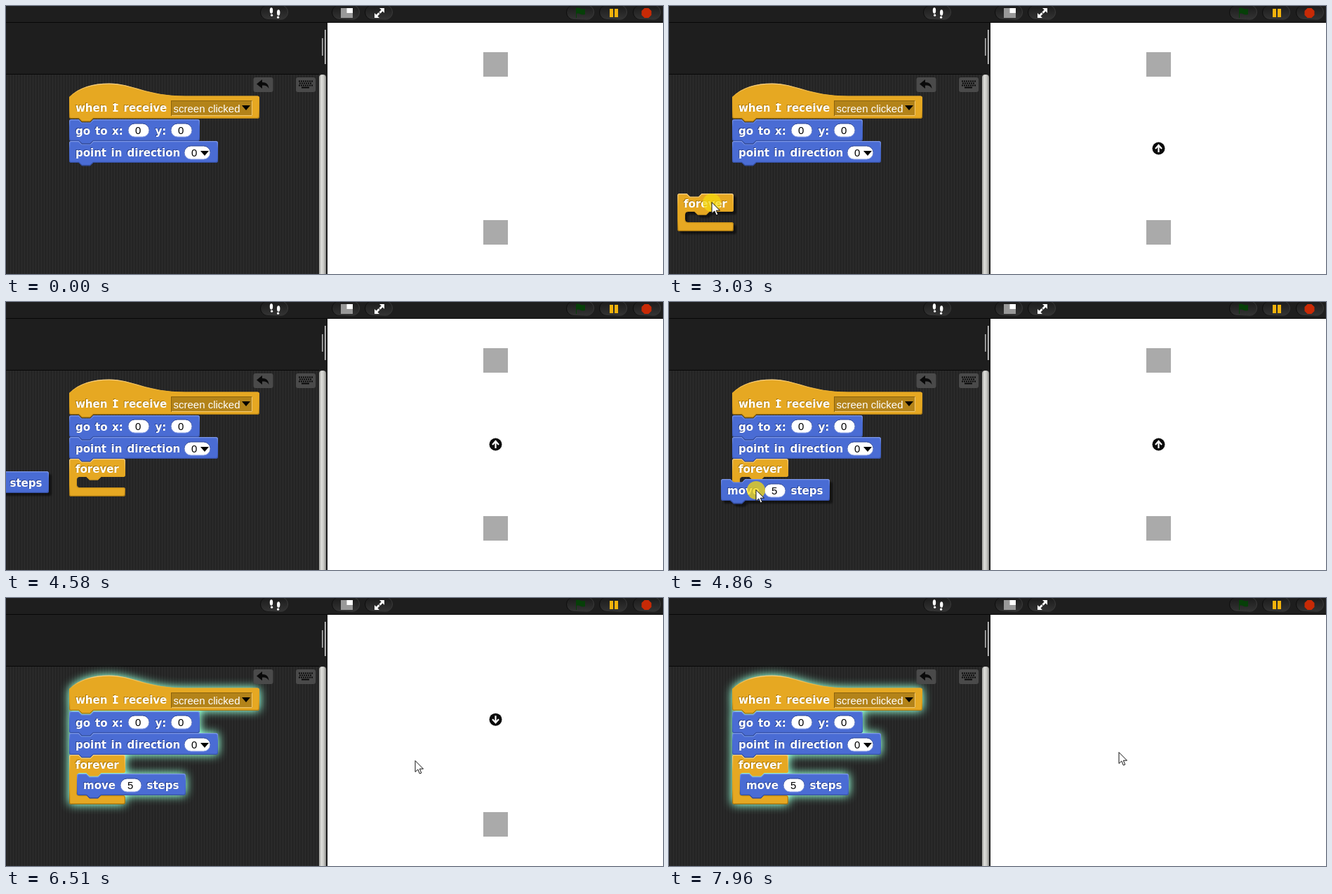
An HTML page that plays this animation: 936 by 383 pixels, repeating every 8 s.

```html
<!DOCTYPE html>
<html lang="en">
<head>
<meta charset="utf-8">
<title>Block script demo</title>
<style>
  html, body { margin: 0; width: 100%; height: 100%; overflow: hidden; background: #1e1e1e; }
  svg { display: block; }
  .word { font: bold 15px "DejaVu Sans", Verdana, sans-serif; }
  .value { font: 15px "Liberation Sans", Arial, sans-serif; }
</style>
</head>
<body>
<svg id="view" width="936" height="383" viewBox="0 0 936 383">
  <defs>
    <linearGradient id="blueEdge" x2="0" y2="1">
      <stop offset="0" stop-color="#7f99e8"/><stop offset=".3" stop-color="#4a6cd4"/>
      <stop offset=".7" stop-color="#4262c4"/><stop offset="1" stop-color="#2b418a"/>
    </linearGradient>
    <linearGradient id="goldEdge" x2="0" y2="1">
      <stop offset="0" stop-color="#f5d088"/><stop offset=".35" stop-color="#e6a822"/>
      <stop offset=".7" stop-color="#d59a1c"/><stop offset="1" stop-color="#94690f"/>
    </linearGradient>
    <linearGradient id="ovalEdge" x2="0" y2="1">
      <stop offset="0" stop-color="#2c4490"/><stop offset="1" stop-color="#8ea4ea"/>
    </linearGradient>
    <linearGradient id="pill" x2="0" y2="1">
      <stop offset="0" stop-color="#1a1a1a"/><stop offset="1" stop-color="#343434"/>
    </linearGradient>
    <linearGradient id="pillEdge">
      <stop offset="0" stop-color="#0c0c0c"/><stop offset="1" stop-color="#3a3a3a"/>
    </linearGradient>
    <linearGradient id="bar">
      <stop offset="0" stop-color="#a0a09c"/><stop offset=".35" stop-color="#dededa"/>
      <stop offset=".7" stop-color="#c4c4c0"/><stop offset="1" stop-color="#858582"/>
    </linearGradient>
    <pattern id="weave" width="4" height="4" patternUnits="userSpaceOnUse">
      <rect width="4" height="4" fill="#292929"/>
      <rect width="1" height="4" fill="#202020"/>
    </pattern>
    <filter id="glow" x="-20%" y="-20%" width="140%" height="140%" color-interpolation-filters="sRGB">
      <feGaussianBlur in="SourceAlpha" stdDeviation="7" result="soft"/>
      <feComponentTransfer in="soft" result="halo">
        <feFuncR type="linear" slope="0" intercept=".56"/>
        <feFuncG type="linear" slope="0" intercept=".96"/>
        <feFuncB type="linear" slope="0" intercept=".8"/>
        <feFuncA type="linear" slope="1.35"/>
      </feComponentTransfer>
      <feMerge><feMergeNode in="halo"/><feMergeNode in="SourceGraphic"/></feMerge>
    </filter>
    <filter id="lift" x="-10%" y="-10%" width="130%" height="150%">
      <feDropShadow dx="4" dy="4" stdDeviation="1.2" flood-color="#000" flood-opacity=".5"/>
    </filter>
  </defs>

  <!-- stage -->
  <rect x="458" y="24" width="478" height="359" fill="#fff"/>
  <rect id="topBox" x="680" y="66" width="35" height="35" fill="#aaa"/>
  <rect id="lowBox" x="680" y="306" width="35" height="35" fill="#aaa"/>
  <g id="ball">
    <circle r="9" fill="#0a0a0a"/>
    <path d="M0 5.5V-4M-4.5 .5L0-4.5L4.5 .5" fill="none" stroke="#fff" stroke-width="2.2"/>
  </g>

  <!-- panels -->
  <rect width="936" height="24" fill="#1e1e1e"/>
  <rect y="24" width="458" height="74" fill="#1e1e1e"/>
  <path d="M0 23.5H936M0 97.5H446" stroke="#070707"/>
  <rect y="98" width="446" height="285" fill="url(#weave)"/>
  <rect x="446" y="98" width="12" height="285" fill="#222"/>
  <path d="M446 383V102q0-4 5-4t5 4V383z" fill="url(#bar)"/>
  <path d="M457.5 24V383" stroke="#111"/>
  <path d="M450.8 46V71" stroke="#b0b0b0" stroke-width="1.6"/>
  <path d="M454.8 34V83" stroke="#d0d0d0" stroke-width="1.6"/>

  <!-- toolbar -->
  <g id="pills"></g>
  <g fill="#fff">
    <ellipse cx="378" cy="6.5" rx="2.2" ry="4.2"/><circle cx="378.6" cy="13.2" r="1.6"/>
    <ellipse cx="388.2" cy="9.5" rx="2.2" ry="4.2"/><circle cx="387.6" cy="16.2" r="1.6"/>
    <path d="M539 3v7l-2.4-2.4-3.2 3.2-2-2 3.2-3.2L532 3zM525 17v-7l2.4 2.4 3.2-3.2 2 2-3.2 3.2L532 17z"/>
  </g>
  <rect x="477" y="3" width="17" height="14" fill="#999"/>
  <rect x="485.500" y="3" width="8.500" height="7" fill="#fff"/>
  <path d="M812 17V3c5-2 7 3 13 1v8c-6 2-8-3-12-1v6z" fill="#063f08"/>
  <path d="M860 4h5v12h-5zM867 4h5v12h-5z" fill="#f2b20c"/>
  <path d="M909.6 3h5.800l4.100 4.100v5.800l-4.100 4.100h-5.800l-4.100-4.100v-5.800z" fill="#c82a06"/>

  <!-- scripts -->
  <g id="script"></g>
  <rect id="hint" height="5" rx="2" fill="#fff"/>
  <g id="loopDrag" filter="url(#lift)"></g>
  <g id="stepDrag" filter="url(#lift)"></g>

  <g transform="translate(0 -1)">
    <g fill="#4a4a4a">
      <rect x="352.5" y="103" width="28" height="21" rx="3"/>
      <rect x="413" y="103" width="28" height="21" rx="3"/>
    </g>
    <path d="M357 112.5l8-6.5v4c6 0 9 3 9.5 9c-2.5-4-5-4.5-9.5-4.5v4.5z" fill="#0a0a0a"/>
    <path d="M417 108.5h20M418 111.5h18M417 114.5h20" stroke="#0a0a0a" stroke-width="2" stroke-dasharray="2 1"/>
    <path d="M421 117.5h11" stroke="#0a0a0a" stroke-width="2"/>
  </g>

  <circle id="press" r="13" fill="#f4d80e" opacity=".75"/>
  <path id="cursor" d="M0 .5V16.5L3.8 13L6.3 19L8.8 18L6.3 12.200H11.500Z" fill="#fff" stroke="#111"/>
</svg>
<script>
const $ = id => document.getElementById(id);

// ---- block shapes ----
const DENT = 'H13.5l4.5 4.5h12l4.5-4.5';
const END = 'q0 3-3 3H34.5l-4.5 4.5h-12l-4.5-4.5H3q-3 0-3-3';
const command = (w, h) => `M0 3q0-3 3-3${DENT}H${w - 3}q3 0 3 3V${h - 3}${END}z`;
const hat = `M0 1C14-13 34-18.5 57-18.5C90-18.5 110-.5 165-.5H268q3 0 3 3V29${END}z`;
const cShape = s => `M0 3q0-3 3-3${DENT}H77q3 0 3 3V23q0 3-3 3H45.5l-4.5 4.5h-12l-4.5-4.5H15` +
  `q-4 0-4 4V${22 + s}q0 4 4 4H77q3 0 3 3v7q0 3-3 3H3q-3 0-3-3z`;

const TONES = { blue: ['#4a6cd4', '#2c4490'], gold: ['#e6a822', '#a87810'] };
let clips = 0;

// The bevel is a stroke clipped to the block, so it stays inside the outline.
function block(tone, x, y, path, words, extra = '') {
  const [fill, dark] = TONES[tone], clip = `clip${clips++}`;
  const text = words.map(([wx, wy, s]) =>
    `<text class="word" x="${wx - 1}" y="${wy - 1}" fill="${dark}">${s}</text>` +
    `<text class="word" x="${wx}" y="${wy}" fill="#fff">${s}</text>`).join('');
  return `<g transform="translate(${x} ${y})"><clipPath id="${clip}"><path d="${path}"/></clipPath>` +
    `<path d="${path}" fill="${fill}" stroke="url(#${tone}Edge)" stroke-width="2.4" ` +
    `clip-path="url(#${clip})"/>${text}${extra}</g>`;
}

const oval = (x, y, w, s) =>
  `<rect x="${x}" y="${y}" width="${w}" height="19" rx="9.5" fill="#fff" stroke="url(#ovalEdge)"/>` +
  `<text class="value" x="${x + 10}" y="${y + 15}" fill="#000">${s}</text>`;
const arrow = (x, y) => `<path d="M${x} ${y}h12l-6 7z" fill="#000"/>`;

const event = block('gold', 90, 129, hat, [[9, 22, 'when'], [62.5, 22, 'I'], [77.5, 22, 'receive']],
  '<path d="M62.5 12h7M62.5 21h7" stroke="#fff" stroke-width="2"/>' +
  '<rect x="145.5" y="6.5" width="115" height="21" fill="#b38319" stroke="#8a630e"/>' +
  '<path d="M146 27.5h114.5v-21" fill="none" stroke="#efc670"/>' +
  '<text class="value" x="148.5" y="23" fill="#fff">screen clicked</text>' + arrow(246, 13));
const goTo = block('blue', 90, 162, command(186, 31),
  [[9, 22, 'go'], [37, 22, 'to'], [61, 22, 'x:'], [122.5, 22, 'y:']],
  oval(84, 6, 30, 0) + oval(145, 6, 30, 0));
const point = block('blue', 90, 193, command(212, 31),
  [[9, 22, 'point'], [59.5, 22, 'in'], [82.5, 22, 'direction']],
  oval(164, 7, 37, 0) + arrow(187, 14));
const forever = (x, y, s) => block('gold', x, y, cShape(s), [[9, 20, 'forever']]);
const move = (x, y) => block('blue', x, y, command(155, 31),
  [[9, 22, 'move'], [99.5, 22, 'steps']], oval(62, 7, 30, 5));

$('script').innerHTML = event + goTo + point +
  `<g id="loopEmpty">${forever(90, 224, 15)}</g>` +
  `<g id="loopFull">${forever(90, 224, 32)}${move(101, 251)}</g>`;
$('loopDrag').innerHTML = forever(0, 0, 15);
$('stepDrag').innerHTML = move(0, 0);
$('pills').innerHTML = [362, 464, 511, 798, 845, 893].map(x =>
  `<rect x="${x + .5}" y="-1.5" width="39" height="21" rx="10.5" fill="url(#pill)" stroke="url(#pillEdge)"/>`).join('');

// ---- motion: the picture only changes in bursts of [start, end, steps] ----
const LOOP = 8000;
const BURSTS = [[260, 750, 8], [1080, 1150, 2], [2160, 2500, 6], [3030, 3640, 9], [3780, 3910, 3],
  [4580, 4930, 6], [5130, 5540, 7], [6020, 6780, 12], [6850, 7610, 12], [7680, 7960, 5]];

const POINTER = [[0, -60, 280], [259, -60, 280],
  [260, 736, 346], [450, 640, 285], [600, 566, 240], [750, 583, 209],
  [2100, 583, 209], [2228, 480, 224], [2432, 8, 276], [2500, -60, 280], [3029, -60, 280],
  [3030, 61, 280], [3300, 66, 266], [3560, 80, 243], [3780, 80, 243], [3845, 38, 255],
  [3910, -60, 260], [4579, -60, 260],
  [4580, -44, 257], [4720, 46, 244], [4860, 124, 268], [4930, 138, 274], [5130, 138, 274],
  [5267, 300, 252], [5404, 510, 234], [5540, 583, 232],
  [7260, 583, 232], [7610, 638, 219], [7960, 641, 220]];
const FLIGHT = [[6000, 203.5], [6300, 110], [6503, 173.5], [6920, 297], [7600, 99], [7890, 14]];

function held(t) {
  let q = 0;
  for (const [start, end, n] of BURSTS) {
    if (t < start) break;
    const step = (end - start) / (n - 1);
    q = Math.min(end, start + Math.floor((t - start) / step + .001) * step);
  }
  return q;
}

function along(keys, t) {
  const i = keys.findIndex(k => k[0] > t);
  if (i < 0) return keys[keys.length - 1].slice(1);
  if (i === 0) return keys[0].slice(1);
  const a = keys[i - 1], b = keys[i], u = (t - a[0]) / (b[0] - a[0]);
  return a.slice(1).map((v, j) => v + (b[j + 1] - v) * u);
}

const show = (id, on) => { $(id).style.display = on ? '' : 'none'; };
const place = (id, x, y, more = '') => $(id).setAttribute('transform', `translate(${x} ${y})${more}`);

function draw(now) {
  const t = held(now % LOOP), within = (a, b) => t >= a && t < b;
  const [px, py] = along(POINTER, t).map(Math.round);
  const dragLoop = within(3030, 3780), dragStep = within(4580, 5130);

  place('cursor', px, py);
  place('press', px, py + 1);
  show('press', dragLoop || dragStep || within(1080, 1150) || within(6020, 6085));

  show('loopDrag', dragLoop);
  place('loopDrag', px - 49, py - 12);
  show('stepDrag', dragStep);
  place('stepDrag', px - 50, py - 15);
  show('loopEmpty', within(3780, 5130));
  show('loopFull', t >= 5130);

  const hint = $('hint'), inSlot = t > 4000;
  show('hint', within(3550, 3780) || within(4900, 5130));
  hint.setAttribute('x', inSlot ? 101 : 90);
  hint.setAttribute('y', inSlot ? 251 : 228);
  hint.setAttribute('width', inSlot ? 69 : 212);

  if (t >= 6020) $('script').setAttribute('filter', 'url(#glow)');
  else $('script').removeAttribute('filter');

  show('topBox', t < 6300);
  show('lowBox', t < 6920);
  show('ball', within(1080, 7890));
  place('ball', 697.5, along(FLIGHT, t)[0], within(6300, 6920) ? ' rotate(180)' : '');
}

const origin = performance.now();
function tick() {
  draw(performance.now() - origin);
  requestAnimationFrame(tick);
}
tick();
</script>
</body>
</html>
```
